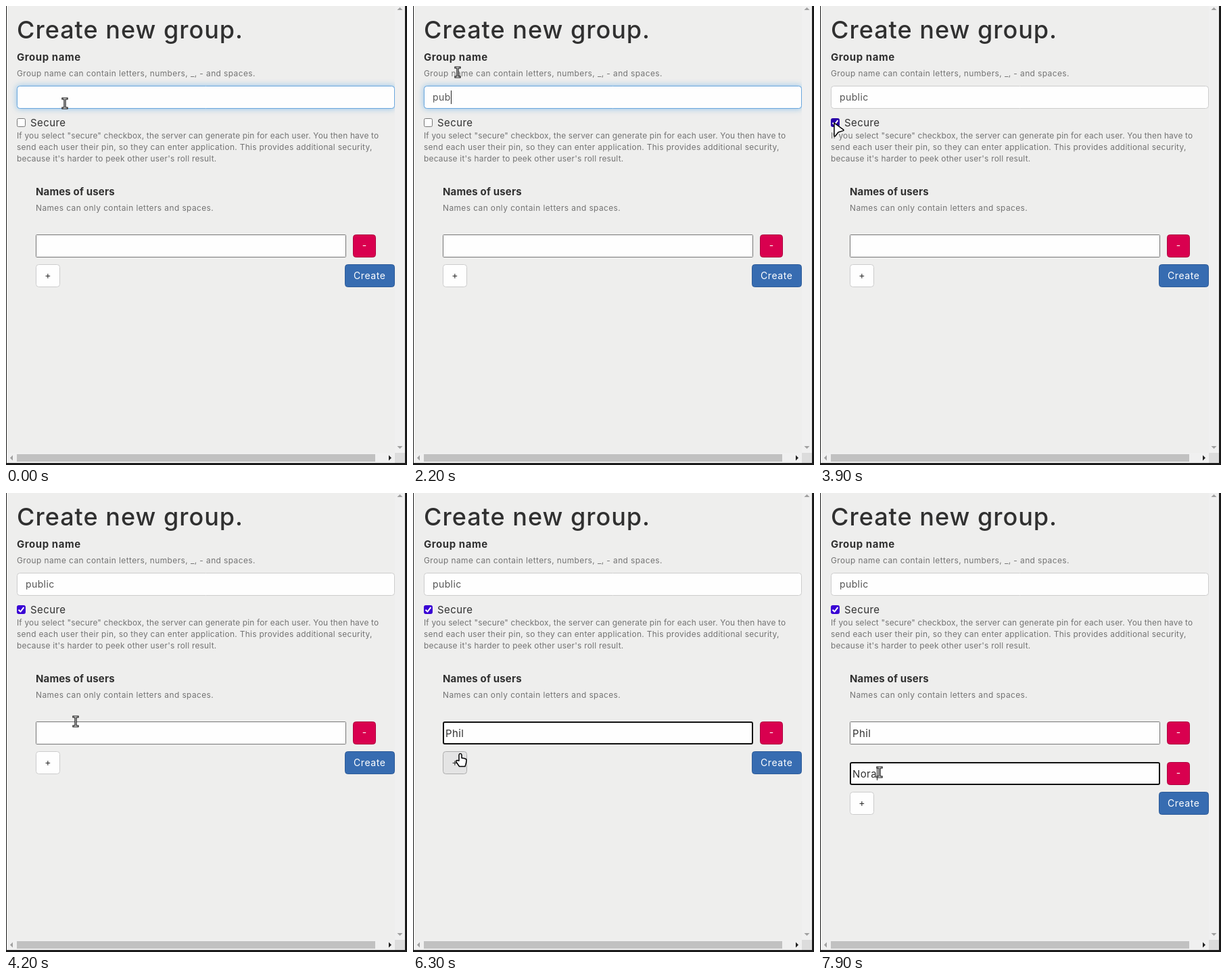
Recreate the animation shown at these times as an HTML page with a canvas. Size 593 px wide and 679 px high, loop 8 s.

```html
<!DOCTYPE html>
<html lang="en">
<head>
<meta charset="utf-8">
<title>Create new group</title>
<style>
  html, body { margin: 0; width: 100%; height: 100%; overflow: hidden; background: #eeeeed; }
  canvas { display: block; width: 593px; height: 679px; }
</style>
</head>
<body>
<canvas id="stage"></canvas>
<script>
const W = 593, H = 679, LOOP = 8000;
const FONT = 'Inter, "Open Sans", sans-serif';
const INK = '#303030', MUTED = '#737373', PAPER = '#fefefe';
const canvas = document.getElementById('stage');
const ctx = canvas.getContext('2d');
const ratio = window.devicePixelRatio || 1;
canvas.width = W * ratio;
canvas.height = H * ratio;

// Each track is a list of [start time, value...]; a value holds until the next one.
const pointer = [
  [0, 'beam', 87, 144], [300, 'beam', 82, 133], [400, 'beam', 71, 111], [500, 'beam', 66, 100],
  [1000, 'beam', 66, 88], [1100, 'beam', 66, 85], [1200, 'beam', 66, 98],
  [3200, 'beam', 65, 100], [3300, 'beam', 60, 112], [3400, 'beam', 48, 134],
  [3500, 'arrow', 31, 158], [3600, 'arrow', 22, 170], [3700, 'arrow', 21, 173],
  [4000, 'arrow', 34, 192], [4100, 'arrow', 74, 276], [4200, 'beam', 103, 338],
  [4400, 'beam', 103, 343], [4600, 'beam', 104, 354],
  [6100, 'beam', 98, 362], [6200, 'hand', 77, 383], [6300, 'hand', 70, 386],
  [6500, 'arrow', 72, 395], [6600, 'arrow', 73, 396], [6700, 'beam', 82, 406],
  [6800, 'beam', 87, 411], [7100, 'beam', 88, 413]
];
const groupTyped = [[0, 0], [1700, 1], [1900, 2], [2200, 3], [2400, 4], [2500, 5], [2600, 6]];
const firstTyped = [[0, 0], [5100, 1], [5300, 2], [5400, 3], [5500, 4]];
const secondTyped = [[0, 0], [7700, 1], [7800, 3], [7900, 4]];
const focus = [[0, 'group'], [3700, ''], [4400, 'first'], [6400, ''], [6500, 'second']];
const caret = [
  [0, false], [500, true], [1000, false], [1600, true], [3200, false],
  [4400, true], [5000, false], [5100, true], [6100, false], [6500, true],
  [7100, false], [7700, true]
];

function at(track, t) {
  let found = track[0];
  for (const key of track) if (key[0] <= t) found = key;
  return found.slice(1);
}

function text(str, x, y, size, { color = INK, weight = 400, gap = 0.4, align = 'left' } = {}) {
  ctx.font = `${weight} ${size}px ${FONT}`;
  ctx.letterSpacing = gap + 'px';
  ctx.textAlign = align;
  ctx.fillStyle = color;
  ctx.fillText(str, x, y);
  return ctx.measureText(str).width;
}

function rect(x, y, w, h, color) {
  ctx.fillStyle = color;
  ctx.fillRect(x, y, w, h);
}

function box(x, y, w, h, radius, fill, border, line = 1) {
  ctx.beginPath();
  ctx.roundRect(x + line / 2, y + line / 2, w - line, h - line, radius);
  ctx.fillStyle = fill;
  ctx.fill();
  ctx.lineWidth = line;
  ctx.strokeStyle = border;
  ctx.stroke();
}

function polygon(points, fill) {
  ctx.beginPath();
  points.forEach(([x, y]) => ctx.lineTo(x, y));
  ctx.closePath();
  ctx.fillStyle = fill;
  ctx.fill();
}

function typed(str, x, y, size, color, showCaret, caretTop) {
  const width = str ? text(str, x, y, size, { color }) : 0;
  if (showCaret) rect(Math.round(x + width), caretTop, 1, 20, '#222');
}

function triangle(x, y, angle, color) {
  ctx.save();
  ctx.translate(x, y);
  ctx.rotate(angle);
  polygon([[-4, 2], [0, -2], [4, 2]], color);
  ctx.restore();
}

function drawFrame() {
  rect(575, 0, 15, 661, '#f0f0f0');
  rect(1, 661, 574, 15, '#f0f0f0');
  rect(575, 661, 15, 15, '#dcdcdc');
  rect(16, 663, 530, 11, '#c1c1c1');
  triangle(582.5, 4, 0, '#a0a0a0');
  triangle(582.5, 653, Math.PI, '#a0a0a0');
  triangle(8, 668.5, -Math.PI / 2, '#a0a0a0');
  triangle(568, 668.5, Math.PI / 2, '#222');
  rect(0, 0, 1, H, '#1b1b1b');
  rect(590, 0, 3, H, '#1b1b1b');
  rect(0, 676, W, 3, '#1b1b1b');
}

function drawGroupField(value, focused, showCaret) {
  if (focused) {
    ctx.save();
    ctx.shadowColor = 'rgba(102,175,233,.65)';
    ctx.shadowBlur = 8 * ratio;
    box(16, 118, 559, 34, 4, PAPER, '#66afe9');
    ctx.restore();
    rect(575, 100, 15, 70, '#f0f0f0');
  }
  box(16, 118, 559, 34, 4, PAPER, focused ? '#6aa6dc' : '#ccc');
  typed(value, 29, 140, 14, '#555', showCaret, 125);
}

function drawCheckbox(checked, hovered) {
  if (!checked) {
    box(16, 166, 13, 13, 2, PAPER, '#767676');
    return;
  }
  const tint = hovered ? '#2900a8' : '#3903d4';
  box(16, 166, 13, 13, 2, tint, tint);
  ctx.beginPath();
  ctx.moveTo(18.6, 172.8);
  ctx.lineTo(21.4, 175.6);
  ctx.lineTo(26.4, 169.2);
  ctx.lineWidth = 2;
  ctx.strokeStyle = '#fff';
  ctx.stroke();
}

function drawUser(y, value, focused, showCaret) {
  if (focused) box(44, y, 459, 34, 2, PAPER, '#101010', 2);
  else box(44, y, 459, 34, 1, PAPER, '#767676');
  typed(value, 48, y + 23, 15, INK, showCaret, y + 7);
  box(513, y, 34, 34, 4, '#d9004f', '#ae003f');
  text('-', 530, y + 21, 14, { color: '#fff', gap: 0, align: 'center' });
}

function drawButtons(y, hovered) {
  box(44, y, 36, 34, 4, hovered ? '#e4e4e4' : PAPER, hovered ? '#adadad' : '#ccc');
  text('+', 62, y + 21, 14, { gap: 0, align: 'center' });
  box(501, y, 74, 34, 4, '#376cb1', '#2d5b98');
  text('Create', 514, y + 22, 14, { color: '#fff', gap: 0.6 });
}

function outline() {
  ctx.lineJoin = 'round';
  ctx.fillStyle = '#fff';
  ctx.fill();
  ctx.lineWidth = 1.5;
  ctx.strokeStyle = '#000';
  ctx.stroke();
}

const shapes = {
  beam() {
    ctx.beginPath();
    for (const s of [-1, 1]) {
      ctx.moveTo(-3, 7 * s);
      ctx.lineTo(3, 7 * s);
    }
    ctx.moveTo(0, -7);
    ctx.lineTo(0, 7);
    ctx.lineCap = 'square';
    ctx.lineWidth = 3.2;
    ctx.strokeStyle = '#000';
    ctx.stroke();
    ctx.lineWidth = 1;
    ctx.strokeStyle = '#fff';
    ctx.stroke();
    ctx.lineCap = 'butt';
  },
  arrow() {
    ctx.beginPath();
    ctx.moveTo(0, 0);
    ctx.lineTo(0, 19.5);
    ctx.quadraticCurveTo(1, 20.5, 2, 19);
    ctx.lineTo(6, 13.8);
    ctx.lineTo(13, 11.6);
    ctx.quadraticCurveTo(14.8, 10.8, 13.5, 9.8);
    ctx.closePath();
    outline();
  },
  hand() {
    ctx.beginPath();
    ctx.moveTo(-2, 10);
    ctx.lineTo(-2, 1.5);
    ctx.quadraticCurveTo(-1.8, -0.4, 0, -0.4);
    ctx.quadraticCurveTo(1.8, -0.4, 2, 1.5);
    ctx.lineTo(2, 6);
    ctx.lineTo(6.5, 6.8);
    ctx.quadraticCurveTo(9, 7.2, 9, 9.5);
    ctx.lineTo(8.5, 13.5);
    ctx.lineTo(7, 18.5);
    ctx.lineTo(-1.5, 18.5);
    ctx.lineTo(-6, 12);
    ctx.quadraticCurveTo(-6.8, 9.6, -4.6, 9.4);
    ctx.closePath();
    outline();
  }
};

function render(t) {
  ctx.setTransform(ratio, 0, 0, ratio, 0, 0);
  rect(0, 0, W, H, '#eeeeed');
  drawFrame();

  const [focused] = at(focus, t);
  const [blink] = at(caret, t);
  const isOn = name => focused === name;
  const extra = t >= 6500;

  text('Create new group.', 16, 48, 36, { weight: 500, gap: 1 });
  text('Group name', 16, 81, 15, { weight: 700, gap: 0.55 });
  const hint = { color: MUTED, gap: 0.43 };
  text('Group name can contain letters, numbers, _, - and spaces.', 16, 104, 11.9, hint);
  drawGroupField('public'.slice(0, at(groupTyped, t)[0]), isOn('group'), blink && isOn('group'));

  drawCheckbox(t >= 3800, t < 4000);
  text('Secure', 36, 178, 15);
  text('If you select "secure" checkbox, the server can generate pin for each user. You then have to',
    16, 196, 11.9, { color: MUTED, gap: 0.18 });
  text('send each user their pin, so they can enter application. This provides additional security,',
    16, 213, 11.9, { color: MUTED, gap: 0.32 });
  text("because it's harder to peek other user's roll result.",
    16, 230, 11.9, { color: MUTED, gap: 0.24 });

  text('Names of users', 44, 280, 15, { weight: 700, gap: 0.15 });
  text('Names can only contain letters and spaces.', 44, 303, 11.9, hint);
  drawUser(338, 'Phil'.slice(0, at(firstTyped, t)[0]), isOn('first') || (t >= 6400 && !extra),
    blink && isOn('first'));
  if (extra) drawUser(398, 'Nora'.slice(0, at(secondTyped, t)[0]), true, blink);

  const [shape, x, y] = at(pointer, t);
  drawButtons(extra ? 442 : 382, shape === 'hand');
  ctx.translate(x, y);
  shapes[shape]();
}

function tick(now) {
  render(now % LOOP);
  requestAnimationFrame(tick);
}
requestAnimationFrame(tick);
</script>
</body>
</html>
```
